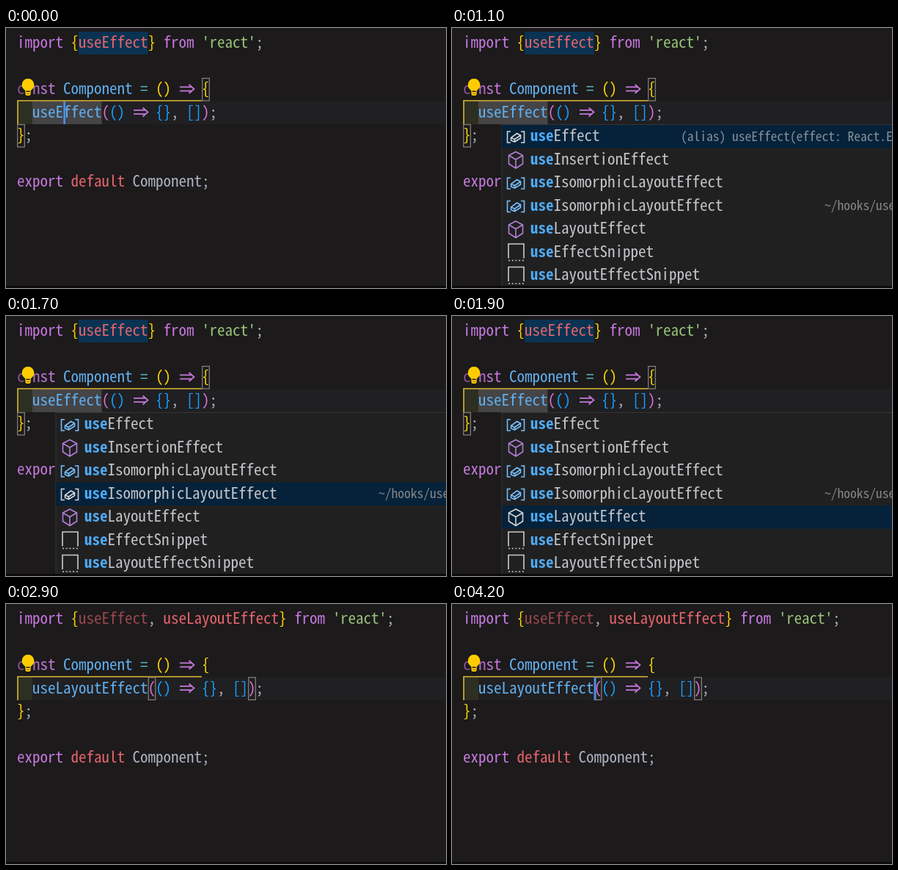
An HTML page for the animation above (4.3 s loop, 600 px wide and 354 px high).

```html
<!DOCTYPE html>
<html lang="en">
<head>
<meta charset="utf-8">
<title>Editor completion</title>
<style>
html, body { margin: 0; width: 100%; height: 100%; overflow: hidden; background: #1c1a1b; }
svg { display: block; width: 600px; height: 354px; }
text {
  font-family: 'Noto Sans Mono CJK KR', 'Noto Sans Mono CJK JP', 'Noto Sans Mono CJK SC', 'Noto Sans Mono', monospace;
  font-variant-ligatures: none;
  white-space: pre;
}
</style>
</head>
<body>
<svg id="stage" viewBox="0 0 600 354" xmlns="http://www.w3.org/2000/svg"></svg>
<script>
const LOOP = 4300, CH = 10.5, LINE = 31.5, X0 = 15;
const KEY = '#c678dd', RED = '#e5646c', BLUE = '#61afef', GOLD = '#ffd700', PINK = '#da70d6',
  DEEP = '#179fff', GREEN = '#98c379', GRAY = '#abb2bf', CYAN = '#56b6c2';
const FAMILY = getComputedStyle(document.body.appendChild(
  document.createElementNS('http://www.w3.org/2000/svg', 'text'))).fontFamily;
document.body.lastChild.remove();

// Font size per pixel of character advance
const pen = document.createElement('canvas').getContext('2d');
pen.font = `100px ${FAMILY}`;
const EM = 100 / pen.measureText('0').width;

const colX = c => X0 + c * CH;
const rect = (x, y, w, h, fill, more = '') =>
  `<rect x="${x}" y="${y}" width="${w}" height="${h}" fill="${fill}" ${more}/>`;
const text = (x, y, str, fill, advance = CH, more = '') =>
  `<text x="${x}" y="${y}" fill="${fill}" font-size="${advance * EM}" ${more}>${str}</text>`;
const path = (d, stroke, width = 1.6, more = '') =>
  `<path d="${d}" fill="none" stroke="${stroke}" stroke-width="${width}" ${more}/>`;
const group = (id, body) => `<g id="${id}">${body}</g>`;

const arrow = (x, y) =>
  path(`M${x + 1.5} ${y - 2.6}H${x + 18}M${x + 1.5} ${y + 2.6}H${x + 18}M${x + 14} ${y - 6}L${x + 21} ${y}L${x + 14} ${y + 6}`, KEY, 1.7);

// Tokens are [string, colour] pairs; '=>' is drawn as a joined arrow
function code(line, col, ...tokens) {
  let out = '';
  for (const [str, fill] of tokens) {
    const y = 27 + line * LINE;
    if (str === '=>') out += arrow(colX(col), y - 7);
    else if (str.trim()) out += text(colX(col), y, str, fill);
    col += str.length;
  }
  return out;
}

const SP = [' ', GRAY];
const fromReact = [['}', GOLD], SP, ['from', KEY], SP, ["'react'", GREEN], [';', GRAY]];
const call = name => code(3, 2, [name, BLUE], ['(', PINK], ['()', DEEP], SP, ['=>', KEY], SP,
  ['{}', DEEP], [',', GRAY], SP, ['[]', DEEP], [')', PINK], [';', GRAY]);
const pairBox = (col, line) =>
  rect(colX(col) + .7, 5.5 + line * LINE, CH - .9, 30.5, 'none', 'stroke="#85857d" stroke-width="1.2"');

const bulb =
  `<path d="M30 69a8.3 8.3 0 0 0-5 14.9c1 .9 1.4 1.6 1.4 2.600V89.500q0 2.500 2.500 2.500h2.200q2.500 0 2.500-2.500V86.500c0-1 .4-1.700 1.400-2.600A8.300 8.300 0 0 0 30 69z" fill="#ffcc00"/>` +
  path('M27.500 86.300H32.500', '#1c1a1b', 1.500) + path('M28.300 89.500H31.700', '#806600', 1);

const base =
  rect(0, 0, 600, 354, '#1c1a1b') +
  rect(17, 99.5, 583, 31.5, '#201f21') +
  rect(17, 100, 19, 31, '#2d2f22') +
  code(2, 0, ['c', '#8a5395']) +
  code(2, 2, ['n', '#b06bc4'], ['st', KEY], SP, ['Component', BLUE], SP, ['=', CYAN], SP, ['()', GOLD], SP, ['=>', KEY], SP, ['{', GOLD]) +
  code(4, 0, ['}', GOLD], [';', GRAY]) +
  code(6, 0, ['export', KEY], SP, ['default', RED], SP, ['Component', GRAY], [';', GRAY]) +
  path('M16 131V99H267', '#dcbb35', 1.6) + bulb;

const before =
  rect(99, 5, 94.5, 31, '#0a3352') + rect(36, 100, 94.5, 31, '#454446') +
  code(0, 0, ['import', KEY], SP, ['{', GOLD], ['useEffect', RED], ...fromReact) +
  call('useEffect') + pairBox(24, 2) + pairBox(0, 4);

const after =
  code(0, 0, ['import', KEY], SP, ['{', GOLD]) +
  group('unused', code(0, 8, ['useEffect', RED])) +
  code(0, 17, [',', GRAY], SP, ['useLayoutEffect', RED], ...fromReact) +
  call('useLayoutEffect') + pairBox(17, 3) + pairBox(30, 3);

// Completion list
const icons = {
  variable: ['#75beff',
    'M80 -7H75.500V8H80M94 -7H98.500V8H94M80.500 1.500V5L85.500 7L93.500 2V-2L88.500 -4.500ZM80.500 1.500L85.500 3.500L93.500 -2M85.500 3.500V7'],
  method: ['#b180d7',
    'M87 -11L96.500 -6V5.500L87 11.500L77.500 5.500V-6ZM77.500 -6L87 -.5L96.500 -6M87 -.5V11.500'],
  snippet: ['#cccccc', 'M77 8V-11.500H98V8M77 11h2m2.700 0h2m2.700 0h2m2.700 0h2m2.700 0h2']
};
const items = [
  ['variable', 'Effect'], ['method', 'InsertionEffect'],
  ['variable', 'IsomorphicLayoutEffect'], ['variable', 'IsomorphicLayoutEffect'],
  ['method', 'LayoutEffect'], ['snippet', 'EffectSnippet'], ['snippet', 'LayoutEffectSnippet']
];
const rowY = i => 132 + i * LINE;
const NOTE = 8.75;
const menu =
  rect(68, 131.5, 533, 222, '#212021', 'stroke="#353436" stroke-width="1"') +
  rect(68, 132, 532, LINE, '#05223a', 'id="pick"') +
  items.map(([kind, rest], i) => {
    const y = rowY(i), [color, d] = icons[kind];
    return path(d, color, 1.600, `class="icon" data-color="${color}" transform="translate(0 ${y + 16})"`) +
      text(107, y + 22, 'use', '#4eaaf5', CH, 'font-weight="700"') +
      text(107 + 3 * CH, y + 22, rest, '#c3c5c9');
  }).join('') +
  group('alias', text(312, rowY(0) + 21.5, '(alias) useEffect(effect: React.EffectCallback', '#87909a', NOTE)) +
  text(508, rowY(3) + 21.5, '~/hooks/useIsomorphic', '#87878a', NOTE);

const stage = document.getElementById('stage');
stage.innerHTML = base + group('before', before) + group('after', after) +
  rect(0, 100, 2.600, 31, '#4a90f0', 'id="caret"') + group('menu', menu) +
  rect(0, 351, 600, 3, '#0c0b0c');

const el = id => document.getElementById(id);
const [beforeG, afterG, menuG, caret, pick, alias, unused] =
  ['before', 'after', 'menu', 'caret', 'pick', 'alias', 'unused'].map(el);
const iconEls = [...document.querySelectorAll('.icon')];
const show = (node, on) => node.setAttribute('display', on ? 'inline' : 'none');

const MOVED = 200, OPEN = 800, ACCEPT = 2200, FADE = 2800;
const STEPS = [1400, 1600, 1700, 1800];

function render(t) {
  const done = t >= ACCEPT;
  show(beforeG, !done);
  show(afterG, done);
  show(menuG, t >= OPEN && !done);

  const row = STEPS.filter(s => t >= s).length;
  pick.setAttribute('y', rowY(row));
  show(alias, row === 0);
  iconEls.forEach((n, i) => n.setAttribute('stroke', i === row ? '#d4d4d4' : n.dataset.color));

  // The caret blinks every half second, restarting after each edit
  const since = done ? ACCEPT : t >= MOVED ? MOVED : 0;
  caret.setAttribute('x', colX(done ? 17 : t >= MOVED ? 5 : 6) + .4);
  show(caret, (t - since) % 1000 < 500);
  unused.setAttribute('opacity', t >= FADE ? .62 : 1);
}

const start = performance.now();
function tick() {
  render((performance.now() - start) % LOOP);
  requestAnimationFrame(tick);
}
render(0);
requestAnimationFrame(tick);
</script>
</body>
</html>
```
